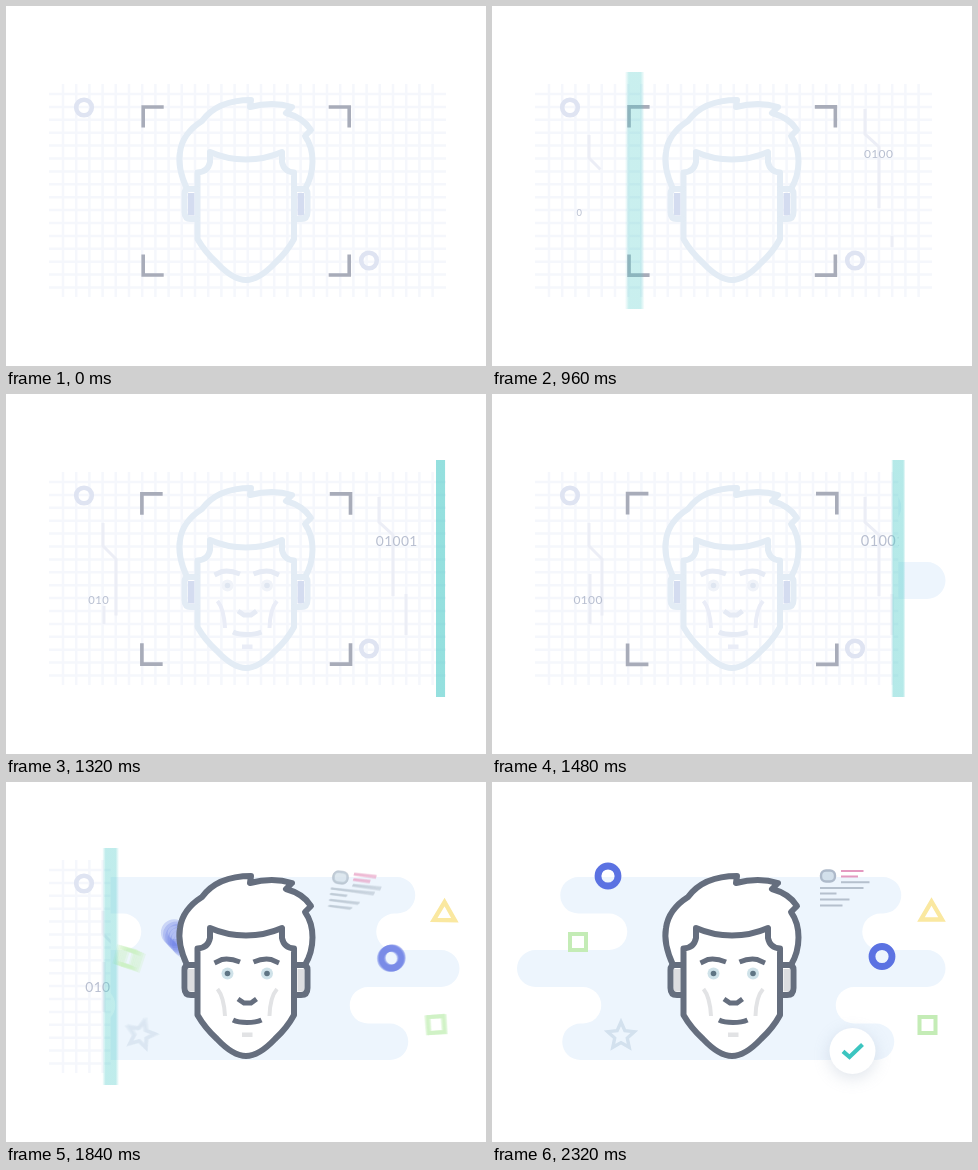
Write an HTML page with a canvas that moves like this. It is 480 px wide and 360 px high and loops after 4.6 s.

```html
<!DOCTYPE html>
<html lang="en">
<head>
<meta charset="utf-8">
<title>Face scan</title>
<style>
  html, body { margin: 0; width: 100%; height: 100%; overflow: hidden; background: #fff; }
  canvas { display: block; }
</style>
</head>
<body>
<canvas id="stage" width="480" height="360"></canvas>
<script>
const ctx = document.getElementById('stage').getContext('2d');
const LOOP = 4600, STEP = 40, TAU = Math.PI * 2;
const LEFT = 42.5, RIGHT = 443.5, MID_Y = 184.5;

const progress = (t, start, length) => Math.min(1, Math.max(0, (t - start) / length));
const easeOut = p => 1 - (1 - p) ** 3;
const swing = p => (1 - Math.cos(Math.PI * p)) / 2;
const backOut = p => 1 + 2.4 * (p - 1) ** 3 + 1.4 * (p - 1) ** 2;

const hair = new Path2D(`M181 183C175 170 172 157 174 146C176 131 185 122 196 115
  C207 100 224 94 245 94L244 101C259 97 273 97 286 101L280 107C291 110 300 116 305 124L299 130
  C309 144 309 166 299 183`);
const face = new Path2D(`M204 146Q221 153.5 240 153.5Q259 153.5 276 146V156Q278 166 288 166.5V233
  Q281 246 269 257Q253 274 240 274Q227 274 211 257Q199 246 191.5 233V166.5Q202 166 204 156Z`);
const ears = new Path2D(`M191 183H183Q178.5 183 178.5 188V206Q178.5 213 185 213H191
  M288 183H297Q301.5 183 301.5 188V206Q301.5 213 295 213H288`);
const headFill = new Path2D(`M181 183C175 170 172 157 174 146C176 131 185 122 196 115
  C207 100 224 94 245 94L244 101C259 97 273 97 286 101L280 107C291 110 300 116 305 124L299 130
  C309 144 309 166 299 183H301.5V213H288V233Q281 246 269 257Q253 274 240 274Q227 274 211 257
  Q199 246 191.5 233V213H178.5V183Z`);
const earInsides = new Path2D('M182 187H188.5V209.5H182ZM291.5 187H298V209.5H291.5Z');
const brows = new Path2D('M208.5 181L216 177.5Q224 176 234 180M273 181L265 177.5Q257 176 247.5 180');
const noseMouth = new Path2D('M232 217L238 221H245L250.5 217M227 238Q232 240.5 241 240.5Q250 240.5 255.5 238');
const cheeks = new Path2D('M211.5 207Q218 215 219 234M271 207Q264 215 263.5 234');
const blob = new Path2D(`M86.5 95H391a18 18 0 0 1 0 36.5H388.5a18.2 18.2 0 0 0 0 36.5H435a18.3 18.3 0 0 1 0 37
  H362a18 18 0 0 0 0 36.5H384a18 18 0 0 1 0 36.5H88.5a18 18 0 0 1 0-36.5H91a18 18 0 0 0 0-36.5
  H43.5a18.3 18.3 0 0 1 0-37H117a18.2 18.2 0 0 0 0-36.5H86.5a18 18 0 0 1 0-36.5Z`);

function stroke(path, color, width, cap = 'butt') {
  ctx.strokeStyle = color;
  ctx.lineWidth = width;
  ctx.lineCap = cap;
  ctx.lineJoin = cap === 'round' ? 'round' : 'miter';
  ctx.stroke(path);
}

function fill(path, color) {
  ctx.fillStyle = color;
  ctx.fill(path);
}

function disc(x, y, r) {
  const path = new Path2D();
  path.arc(x, y, r, 0, TAU);
  return path;
}

function clipped(x, width, draw) {
  if (width <= 0) return;
  ctx.save();
  ctx.beginPath();
  ctx.rect(x, 0, width, 360);
  ctx.clip();
  draw();
  ctx.restore();
}

function drawHead(line, ear) {
  fill(earInsides, ear);
  [hair, face, ears].forEach(path => stroke(path, line, 6, 'round'));
}

function drawFeatures(line, soft, iris, pupil) {
  stroke(brows, line, 5);
  stroke(noseMouth, line, 5);
  stroke(cheeks, soft, 4);
  fill(new Path2D('M236 250.5H246.5V255H236Z'), soft);
  for (const x of [221.5, 261]) {
    fill(disc(x, 191.5, 6), iris);
    fill(disc(x, 191.5, 2.8), pupil);
  }
}

function drawGrid() {
  const grid = new Path2D();
  for (let i = 0; i < 29; i++) {
    grid.moveTo(57 + 13.2 * i, 78);
    grid.lineTo(57 + 13.2 * i, 291);
  }
  for (let i = 0; i < 16; i++) {
    grid.moveTo(43, 88 + 12.9 * i);
    grid.lineTo(440, 88 + 12.9 * i);
  }
  stroke(grid, '#f5f7fc', 2.5);
}

function drawBrackets(t) {
  const pulse = t < 280 ? 0 : (1 - Math.cos((t - 240) / 800 * TAU)) / 2;
  const scale = 1 + 0.016 * pulse;
  ctx.save();
  ctx.translate(240.2, 185);
  for (const sx of [-1, 1]) for (const sy of [-1, 1]) {
    ctx.save();
    ctx.scale(sx * scale, sy * scale);
    stroke(new Path2D('M103 63.5V84H82.5'), '#a8acb9', 3.6);
    ctx.restore();
  }
  ctx.restore();
}

function drawTrace(t, path, length, start, duration) {
  const p = progress(t, start, duration);
  if (!p) return;
  ctx.setLineDash([length * p, 400]);
  stroke(new Path2D(path), '#eceef6', 3);
  ctx.setLineDash([]);
}

function drawDigits(t, x, y, start) {
  if (t < start) return;
  const count = 1 + Math.floor((t - start) / 180);
  ctx.font = `${9 + 0.005 * (t - start)}px Lato, sans-serif`;
  ctx.letterSpacing = '0.4px';
  ctx.fillStyle = '#b8bfd0';
  ctx.fillText('01001'.slice(0, count), x - 0.006 * (t - start), y);
}

function drawPale(t, barX) {
  drawGrid();
  for (const [x, y] of [[78, 101.5], [363, 254.5]]) stroke(disc(x, y, 7.8), '#dfe4f2', 4.6);
  drawTrace(t, 'M373 103V128L387 141V202', 105, 400, 500);
  drawTrace(t, 'M400 241V200', 41, 900, 220);
  drawTrace(t, 'M97 129V152L110 165V222', 98, 720, 600);
  drawTrace(t, 'M98 230V180', 50, 1240, 220);
  drawDigits(t, 375.5, 151.5, 360);
  drawDigits(t, 85, 210, 880);
  drawHead('#e3ecf5', '#d4dcf0');
  const seen = t < 1360 ? barX : 480;
  clipped(0, seen, () => drawFeatures('#e6ebf5', '#eaedf7', '#f0f3f9', '#dfe6f1'));
  drawBrackets(t);
}

const ring = () => stroke(disc(0, 0, 10), '#5b72e2', 6.8);
const square = () => stroke(new Path2D('M-8-8H8V8H-8Z'), '#c4ecb6', 4);
const triangle = () => stroke(new Path2D('M0-9.5L10.5 8.5H-10.5Z'), '#fae8a0', 4.4);

function star() {
  const path = new Path2D();
  for (let i = 0; i < 10; i++) {
    const r = i % 2 ? 6.6 : 14, a = i * TAU / 10;
    path.lineTo(r * Math.sin(a), -r * Math.cos(a));
  }
  path.closePath();
  stroke(path, '#d3e1ee', 3.4);
}

function card() {
  const badge = new Path2D();
  badge.roundRect(-23, -17, 14, 11, 5);
  fill(badge, '#d3e0eb');
  stroke(badge, '#aebaca', 2.4);
  stroke(new Path2D('M-3-16.5H19.5M-3-11H14'), '#e49ac1', 2);
  stroke(new Path2D('M-3-5.3H25.5M-24 .5H19.5M-24 6H-7.5M-24 12H5.5M-24 18H-1.5'), '#b5c0cd', 2);
}

const items = [
  { draw: ring, x: 116, y: 94, start: 1740, spin: 0 },
  { draw: square, x: 86, y: 160, start: 1678, spin: 1.2 },
  { draw: star, x: 129, y: 254, start: 1580, spin: 5 },
  { draw: ring, x: 390, y: 174.5, start: 1555, spin: 0 },
  { draw: square, x: 435.5, y: 243, start: 1550, spin: -2.6 },
  { draw: triangle, x: 439.5, y: 129, start: 1510, spin: 2 },
  { draw: card, x: 352, y: 105.5, start: 1550, spin: 4.4 },
];

// Items fly out from behind the head, smeared while they are fast.
function drawItem(t, item) {
  const at = time => easeOut(progress(time, item.start, 400));
  const moving = at(t) - at(t - 20) > 0.008;
  const copies = moving ? 6 : 1;
  for (let i = copies - 1; i >= 0; i--) {
    const p = at(t - i * 4);
    if (!p) continue;
    ctx.save();
    ctx.globalAlpha = moving ? 0.24 : 1;
    ctx.translate(240 + (item.x - 240) * p, 228 + (item.y - 228) * p);
    ctx.rotate(item.spin * (1 - p));
    item.draw();
    ctx.restore();
  }
}

function drawColored(t) {
  fill(blob, '#edf5fd');
  items.forEach(item => drawItem(t, item));
  fill(headFill, '#fff');
  drawHead('#656e7e', '#dcdde0');
  drawFeatures('#656e7e', '#e2e3e5', '#cfe2e9', '#5f7584');
}

function drawBar(t, x, speed) {
  const grow = easeOut(progress(t, 440, 240)) * (1 - progress(t, 1980, 100));
  if (!grow) return;
  const half = 118.5 * grow, width = 5 + 17 * speed;
  ctx.save();
  ctx.globalAlpha = Math.min(1, 6 / width);
  const across = ctx.createLinearGradient(x - width / 2, 0, x + width / 2, 0);
  const soft = Math.min(0.2, speed * 0.3);
  across.addColorStop(0, soft > 0.02 ? '#4ecbc900' : '#4ecbc9');
  across.addColorStop(soft, '#4ecbc9');
  across.addColorStop(1 - soft, '#4ecbc9');
  across.addColorStop(1, soft > 0.02 ? '#4ecbc900' : '#4ecbc9');
  ctx.fillStyle = across;
  ctx.fillRect(x - width / 2, MID_Y - half, width, 2 * half);
  ctx.restore();
}

function drawCheck(t) {
  const p = progress(t, 2000, 300);
  if (!p) return;
  ctx.save();
  ctx.translate(360.5, 269);
  ctx.scale(backOut(p), backOut(p));
  ctx.shadowColor = 'rgba(150, 165, 190, 0.3)';
  ctx.shadowBlur = 16;
  ctx.shadowOffsetY = 4;
  fill(disc(0, 0, 23), '#fff');
  ctx.shadowColor = 'transparent';
  stroke(new Path2D('M-9.5 .3L-3 6L10-6.5'), '#3cc5c0', 4.2);
  ctx.restore();
}

function barPosition(t) {
  const there = swing(progress(t, 750, 630)), back = swing(progress(t, 1350, 660));
  return LEFT + (RIGHT - LEFT) * Math.min(there, 1 - back);
}

function render(t) {
  const x = barPosition(t);
  const speed = Math.abs(barPosition(t + 10) - barPosition(t - 10)) / 20;
  const edge = t < 1360 ? 480 : x - 42.5 * progress(t, 1940, 80);
  ctx.fillStyle = '#fff';
  ctx.fillRect(0, 0, 480, 360);
  clipped(0, edge, () => drawPale(t, x));
  clipped(edge, 480 - edge, () => drawColored(t));
  drawBar(t, x, speed);
  drawCheck(t);
}

const origin = performance.now();
function tick() {
  const t = (performance.now() - origin) % LOOP;
  render(Math.floor(t / STEP) * STEP);
  requestAnimationFrame(tick);
}
tick();
</script>
</body>
</html>
```
